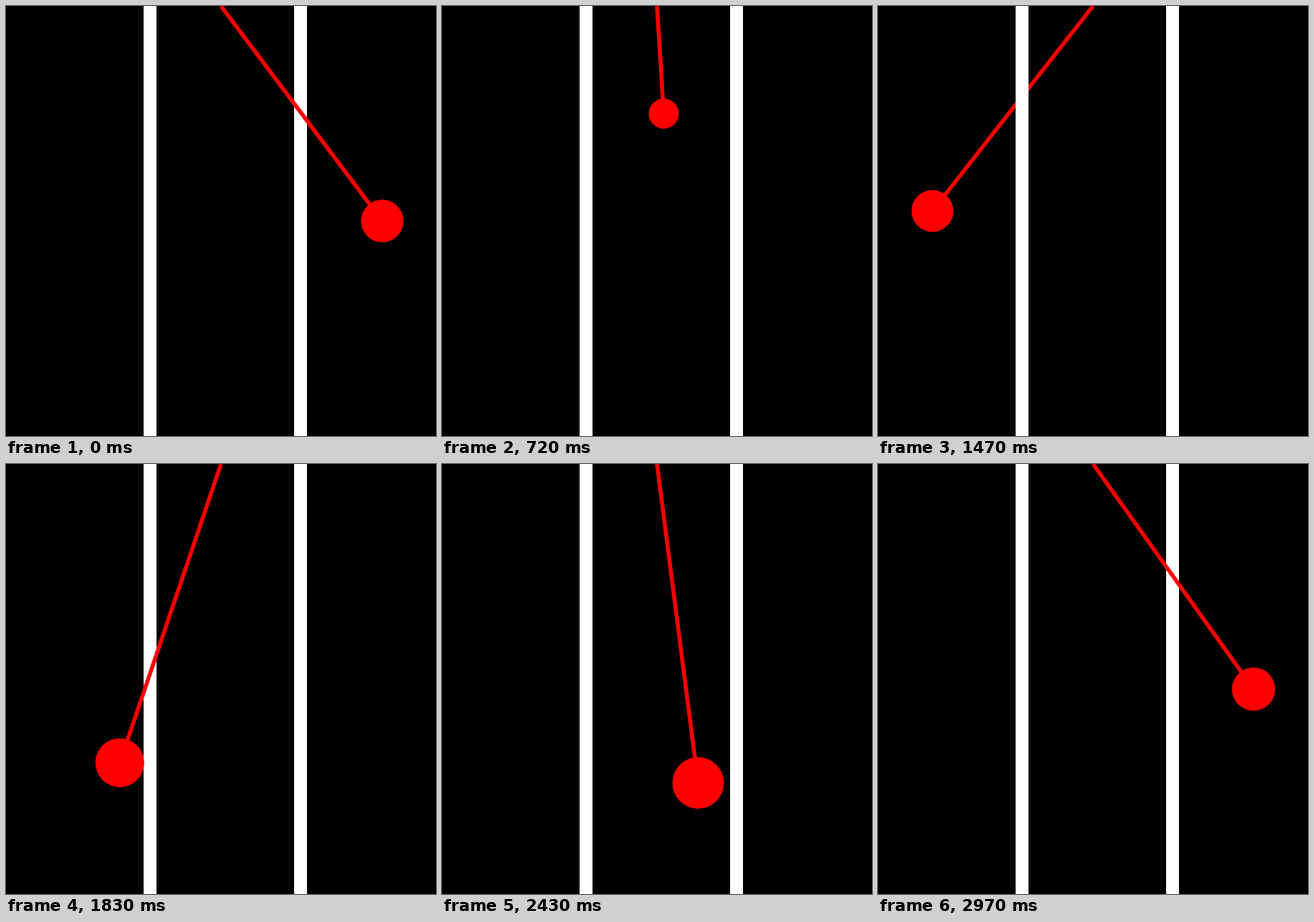
An HTML page with a canvas for the animation above (3 s loop, 600 by 600 pixels).

```html
<!DOCTYPE html>
<html lang="en">
<head>
<meta charset="utf-8">
<title>Orbiting pendulum</title>
<style>
  html, body { margin: 0; width: 100%; height: 100%; overflow: hidden; background: #000; }
  canvas { display: block; }
</style>
</head>
<body>
<canvas id="stage" width="600" height="600"></canvas>
<script>
const ctx = document.getElementById("stage").getContext("2d");
const LOOP = 3000, STEP = 30;
const CENTER = 300, RX = 225, RY = 150;
const BALL = 29.7, CORD = 5.56;

function drawBars() {
  ctx.fillStyle = "#fff";
  for (const x of [192, 402]) ctx.fillRect(x, 0, 18, 600);
}

function drawPendulum(cos, sin) {
  // Polar form of the ellipse: the bearing from its center turns evenly.
  const dist = RX * RY / Math.hypot(RY * cos, RX * sin);
  const x = CENTER + dist * cos;
  const y = CENTER - dist * sin;
  ctx.strokeStyle = ctx.fillStyle = "#f00";
  ctx.lineWidth = CORD;
  ctx.beginPath();
  ctx.moveTo(CENTER, 0);
  ctx.lineTo(x, y);
  ctx.stroke();
  // The ball's area, not its radius, varies linearly with depth.
  ctx.beginPath();
  ctx.arc(x, y, BALL * Math.sqrt(1 - sin / 2), 0, 2 * Math.PI);
  ctx.fill();
}

function draw(ms) {
  const step = Math.floor((ms % LOOP) / STEP);
  const angle = 2 * Math.PI * step * STEP / LOOP;
  const cos = Math.cos(angle), sin = Math.sin(angle);
  const behind = sin > 0;
  ctx.fillStyle = "#000";
  ctx.fillRect(0, 0, 600, 600);
  if (!behind) drawBars();
  drawPendulum(cos, sin);
  if (behind) drawBars();
}

const start = performance.now();
function tick() {
  draw(performance.now() - start);
  requestAnimationFrame(tick);
}
tick();
</script>
</body>
</html>
```
